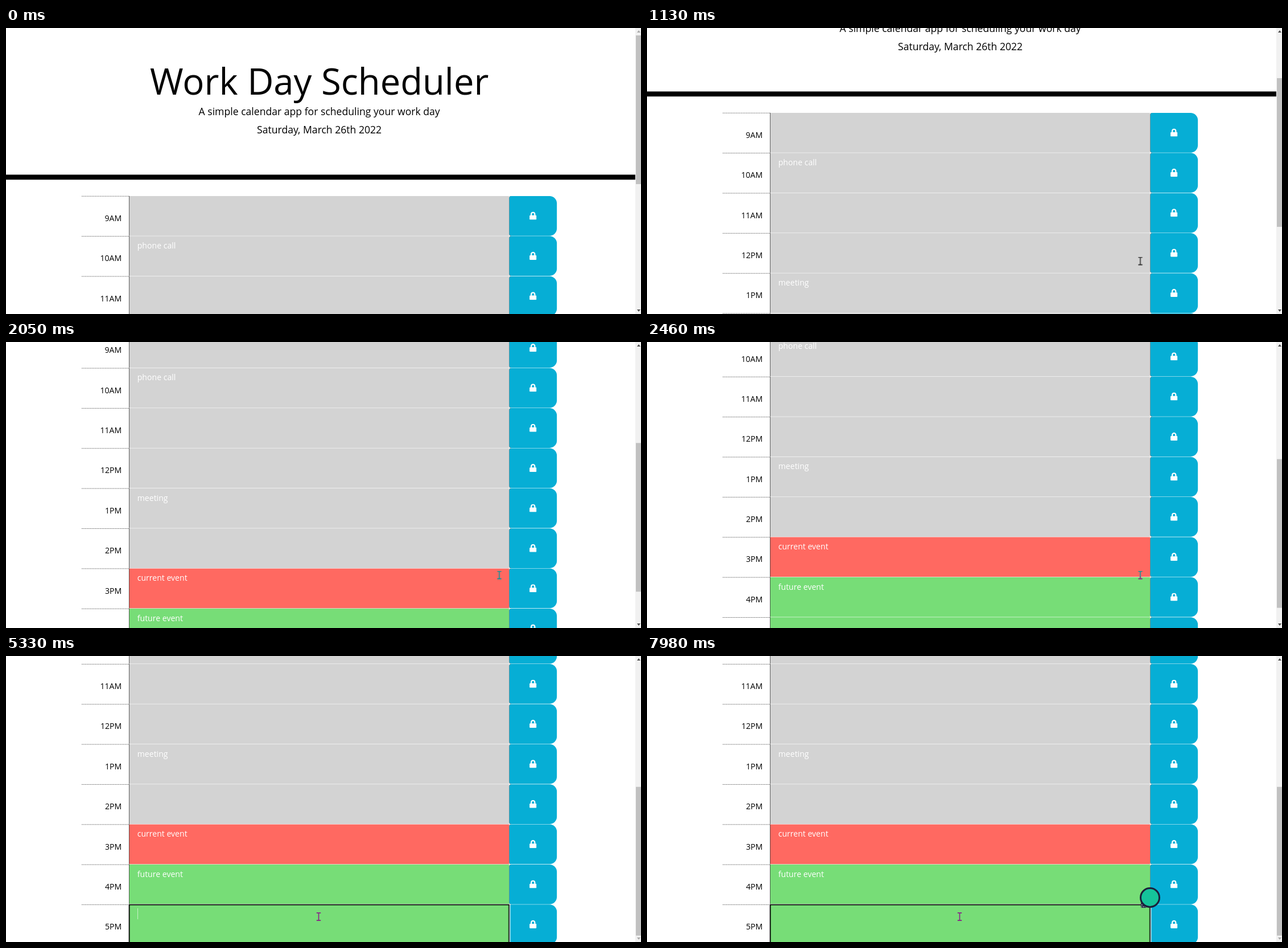
An HTML page that plays this animation: 1116 px wide and 502 px high, repeating every 8 s.

```html
<!DOCTYPE html>
<html lang="en">
<head>
<meta charset="utf-8">
<title>Work Day Scheduler</title>
<style>
@property --y { syntax: "<integer>"; inherits: true; initial-value: 0; }

html, body { margin: 0; width: 100%; height: 100%; overflow: hidden; background: #fff; }

#stage {
  position: relative; width: 1116px; height: 502px; overflow: hidden;
  background: #fff; isolation: isolate;
  animation: scroll 8s infinite step-end;
}
#stage * { position: absolute; box-sizing: border-box; }

/* Page, laid out in screen pixels and shown reduced */
#page {
  left: 0; top: 0; width: 1886px; height: 1584px;
  font: 24px/0 "Open Sans", sans-serif; color: #000; white-space: pre;
  transform-origin: 0 0; transform: scale(.5864) translateY(calc(var(--y) * -1px));
}
.line { left: 0; width: 1878px; margin: 0; text-align: center; font-size: 30px; font-weight: 400; }
h1.line { top: 158px; font-size: 108px; }
.rule { left: 0; top: 439px; width: 1886px; height: 15px; background: #000; }

.row { left: 227px; width: 1424px; height: 120px; }
.dash { left: 0; top: 1px; width: 142px; border-top: 1px dashed #000; }
.hour { left: 0; width: 119.5px; top: 66.5px; text-align: right; }
.note { left: 142px; top: 1px; width: 1139px; height: 119px; background: #d3d3d3; border-left: 1px solid #000; color: #fff; }
.now .note { background: #ff6961; }
.later .note { background: #77dd77; }
.text { left: 23.5px; top: 27.5px; }
.save { left: 1281px; top: 1px; width: 143px; height: 119px; background: #06aed5; border-left: 1px solid #000; border-radius: 6px 22px 22px 6px; }
.save svg { left: 59.5px; top: 47px; width: 21px; height: 24px; }

/* Focused field */
.focus { left: 141px; top: 0; width: 1141px; height: 121px; border: 3px solid #000; box-shadow: 0 0 0 2px #fff; animation: focus 8s infinite step-end; }
.typed { left: 166.5px; top: 28.5px; color: #fff; animation: typed 8s infinite step-end; }
.caret { left: 167px; top: 12px; width: 1px; height: 33px; background: #fff; animation: caret 8s infinite step-end; }

/* Scrollbar */
#bar { left: 1105.5px; top: 0; width: 10.5px; height: 502px; background: #f1f1f1; }
#thumb { left: 1px; top: 13px; width: 9.5px; height: 261px; background: #c1c1c1; transform: translateY(calc(var(--y) * .3014px)); }
.tip { left: 3.5px; border: 3px solid transparent; }
.up { top: 1px; border-bottom: 4px solid #505050; opacity: calc(.45 + var(--y)); }
.down { bottom: 1px; border-top: 4px solid #505050; opacity: calc(719.45 - var(--y)); }

/* Floating badge */
#badge { left: 866px; top: 406px; width: 36px; height: 38px; animation: badge 8s infinite step-end; }
#badge b { left: 2px; top: 26px; width: 10px; height: 10px; border-radius: 2px; background: radial-gradient(circle, #b8bccb .6px, #1b1f3a 1px) 0 0 / 3.3px 3.3px; }
#badge i { left: 0; top: 0; width: 36px; height: 36px; border-radius: 50%; background: #15c39a; border: 3px solid #1b1f3a; }

/* Pointers */
#beam { left: -4.5px; top: -7.5px; width: 9px; height: 15px; mix-blend-mode: difference; animation: beam 8s infinite step-end; }
#arrow { left: 0; top: 0; width: 11px; height: 18px; animation: arrow 8s infinite step-end; }

@keyframes scroll {
  0% { --y: 0; }
  9.125% { --y: 34; animation-timing-function: steps(3); }
  11.7% { --y: 161; animation-timing-function: steps(6); }
  16.625% { --y: 426; }
  20.6% { --y: 439; animation-timing-function: steps(6); }
  25.6% { --y: 545; animation-timing-function: steps(5); }
  29.125% { --y: 624; }
  30.7% { --y: 639; animation-timing-function: steps(2); }
  32.625%, 100% { --y: 719; }
}
@keyframes focus {
  0% { opacity: 0; }
  51.6%, 100% { opacity: 1; }
}
@keyframes typed {
  0%, 90% { opacity: 0; }
  79.2% { opacity: 1; }
  100% { opacity: 0; }
}
@keyframes caret {
  0%, 60%, 73.5%, 85.85%, 96.5%, 100% { opacity: 0; transform: none; }
  51.6%, 66.6%, 90% { opacity: 1; transform: none; }
  79.2% { opacity: 1; transform: translateX(21px); }
}
@keyframes badge {
  0% { opacity: 0; }
  81% { opacity: .5; }
  81.75%, 100% { opacity: 1; }
}
@keyframes beam {
  0% { opacity: 0; transform: translate(866.5px, 408.5px); }
  5.85% { opacity: 1; transform: translate(866.5px, 408.5px); }
  40.875% { opacity: 1; transform: translate(850.5px, 408.5px); animation-timing-function: steps(4); }
  44.2% { opacity: 1; transform: translate(712.5px, 414.5px); animation-timing-function: steps(1); }
  45% { opacity: 1; transform: translate(665.5px, 426.5px); animation-timing-function: steps(5); }
  49.2% { opacity: 1; transform: translate(563.5px, 452px); animation-timing-function: steps(2); }
  50.875%, 100% { opacity: 1; transform: translate(549px, 457px); }
}
@keyframes arrow {
  0% { opacity: 0; transform: translate(1023px, 453px); }
  2.5% { opacity: 1; transform: translate(1023px, 453px); }
  3.4% { opacity: 1; transform: translate(990px, 438px); }
  4.25% { opacity: 1; transform: translate(940px, 420px); }
  5% { opacity: 1; transform: translate(895px, 410px); }
  5.85%, 100% { opacity: 0; transform: translate(866px, 408px); }
}
</style>
</head>
<body>
<div id="stage">
  <div id="page">
    <h1 class="line">Work Day Scheduler</h1>
    <p class="line" style="top:250px">A simple calendar app for scheduling your work day</p>
    <p class="line" style="top:304px">Saturday, March 26th 2022</p>
    <div class="rule"></div>
  </div>
  <div id="bar">
    <div class="tip up"></div>
    <div id="thumb"></div>
    <div class="tip down"></div>
  </div>
  <div id="badge"><b></b><i></i></div>
  <svg id="arrow" viewBox="0 0 11 18"><path d="M.5 .8V14.5L3.6 11.6 5.8 16.8 7.9 15.9 5.7 10.8H10.2Z" fill="#fff" stroke="#000" stroke-width=".8"/></svg>
  <svg id="beam" viewBox="0 0 9 15"><path d="M.8 .9H3.6L4.5 1.4 5.4 .9H8.2M4.5 1V14M.8 14.1H3.6L4.5 13.6 5.4 14.1H8.2" fill="none" stroke="#fff" stroke-width="1.6"/></svg>
</div>
<script>
const page = document.getElementById("page");
const notes = ["", "phone call", "", "", "meeting", "", "current event", "future event", ""];
const lock = `<svg viewBox="0 0 448 512"><rect y="224" width="448" height="288" rx="48" fill="#fff"/>
  <path d="M112 240V152a112 112 0 0 1 224 0v88" fill="none" stroke="#fff" stroke-width="80"/></svg>`;

notes.forEach((note, i) => {
  const hour = 9 + i;
  const label = (hour > 12 ? hour - 12 : hour) + (hour < 12 ? "AM" : "PM");
  const row = document.createElement("div");
  row.className = "row" + (hour === 15 ? " now" : hour > 15 ? " later" : "");
  row.style.top = 502 + i * 120 + "px";
  row.innerHTML = `<div class="dash"></div><div class="hour">${label}</div>` +
    `<div class="note"><div class="text">${note}</div></div><div class="save">${lock}</div>`;
  if (i === notes.length - 1) {
    row.innerHTML += `<div class="focus"></div><div class="typed">m</div><div class="caret"></div>`;
  }
  page.append(row);
});
</script>
</body>
</html>
```
